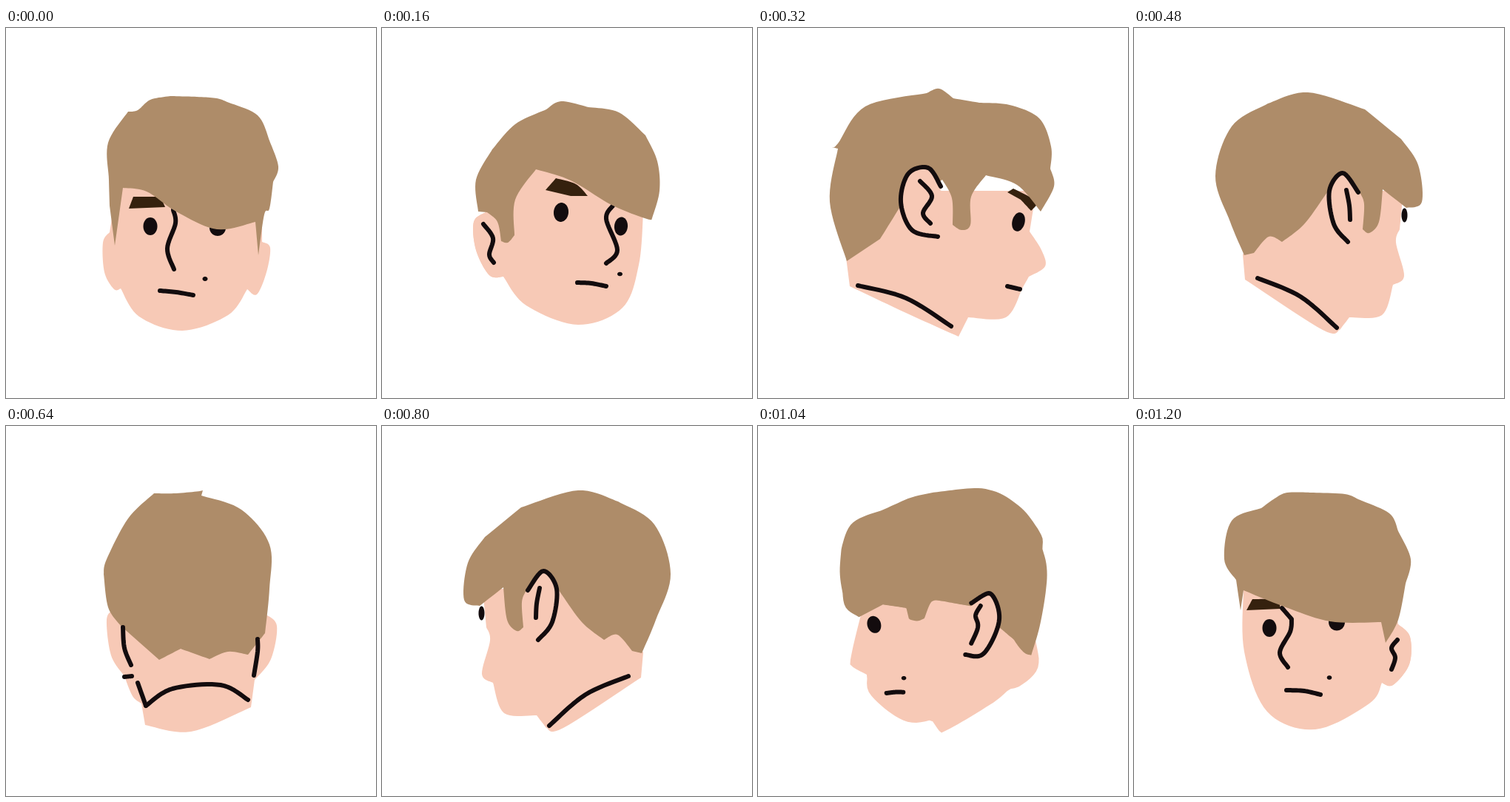
These frames come from a looping animation (500x500 px, 1.28 s). An HTML page with a canvas:

```html
<!DOCTYPE html>
<html lang="en">
<head>
<meta charset="utf-8">
<title>Turning head</title>
<style>
html, body { margin: 0; width: 100%; height: 100%; overflow: hidden; background: #fff; }
canvas { display: block; width: 100vw; height: 100vh; }
</style>
</head>
<body>
<canvas id="stage" width="500" height="500"></canvas>
<script>
const ctx = document.getElementById('stage').getContext('2d');
const STEP = 80;
const SKIN = '#f7c9b6', HAIR = '#ae8c69', INK = '#130c0e', BROW = '#35210e';

// Smooth polyline through a run of points.
function smooth(pts) {
  const out = [pts[0]];
  for (let i = 0; i < pts.length - 1; i++) {
    const b = pts[i], c = pts[i + 1], a = pts[i - 1] || b, d = pts[i + 2] || c;
    for (let k = 1; k <= 10; k++) {
      const t = k / 10;
      out.push([0, 1].map(j => b[j] + t / 2 * (c[j] - a[j]
        + t * (2 * a[j] - 5 * b[j] + 4 * c[j] - d[j] + t * (3 * b[j] - a[j] - 3 * c[j] + d[j])))));
    }
  }
  return out;
}

// "|" marks a corner, "/" parts the outline into runs that are blended separately.
function curve(text) {
  let last = null;
  return text.split('/').map(run => run.split('|').flatMap(part => {
    const pts = part.trim().split(/\s+/).map(p => p.split(',').map(Number));
    if (last) pts.unshift(last);
    last = pts[pts.length - 1];
    return smooth(pts);
  }));
}

function dot(x, y, rx, ry, tilt = 0) {
  const c = Math.cos(tilt), s = Math.sin(tilt);
  return [Array.from({ length: 40 }, (_, i) => {
    const a = i / 20 * Math.PI, u = rx * Math.cos(a), v = ry * Math.sin(a);
    return [x + u * c - v * s, y + u * s + v * c];
  })];
}

const front = {
  skin: curve('140,276 131,290 133,330 146,353 155,352 | 180,390 238,409 300,388 326,353 | 339,360 352,330 357,297 346,289 | 346,215 | 150,215'),
  hair: curve('147,294 140,240 | 139,205 138,155 165,113 | 178,111 195,97 222,92 | 258,93 285,95 299,100 | 340,118 356,152 | 368,187 361,208 | 356,244 349,252 341,307 / 337,262 | 285,272 230,248 190,221 158,216'),
  eye: dot(195, 268, 9.5, 12), eye2: dot(286, 270, 11, 11), mole: dot(269, 339, 3.5, 3),
  brow: curve('166,244 | 172,228 | 209,228 | 215,242'),
  nose: curve('226,246 229,264 218,298 227,326'),
  mouth: curve('208,355 230,357 253,361')
};

const rightHalf = {
  skin: curve('140,249 124,262 127,300 145,334 164,336 | 195,375 265,401 325,378 347,320 353,250 | 300,180 | 200,180'),
  hair: curve('130,248 127,205 149,164 | 180,130 222,110 | 242,99 279,107 | 320,114 356,145 | 372,180 375,220 365,257 / 358,258 310,239 255,206 208,191 | 180,232 179,280 | 170,290 161,288 | 156,262 142,249'),
  eye: dot(242, 249, 10, 13, .1), eye2: dot(323, 268, 9, 12.5, .1), mole: dot(321.5, 332.5, 3.5, 2.7),
  brow: curve('221,219 | 235,203 | 262,211 278,227 | 255,227'),
  nose: curve('312,240 303,258 318,300 303,318'),
  mouth: curve('264,344 283,345 303,349'),
  ear: curve('140,249 124,262 127,300 145,334 164,336'),
  inner: curve('137,265 150,284 145,306 151,317')
};

const rightSide = {
  skin: curve('119,310 124,349 | 200,385 271,417 | 284,391 | 335,391 357,352 | 366,336 | 388,322 383,300 367,275 | 376,220 | 200,220'),
  hair: curve('120,315 97,235 108,163 | 100,161 | 108,156 145,106 228,88 | 245,82 264,95 | 299,101 | 340,104 380,122 396,160 395,190 | 400,214 382,248 / 350,212 308,199 | 288,228 287,266 275,273 263,266 | 262,230 249,205 | 193,240 | 165,285'),
  eye: dot(352, 262, 8.5, 13, .25),
  brow: curve('337,222 | 345,217 | 370,230 376,240 | 369,247 | 355,232'),
  mouth: curve('337,349 354,353'),
  ear: curve('247,214 230,189 203,197 193,235 208,273 243,282'), rim: true,
  inner: curve('219,207 235,227 223,250 233,264'),
  neck: curve('135,348 200,365 261,403')
};

const rightAway = {
  skin: curve('147,306 150,340 | 255,408 278,408 | 291,391 | 335,388 350,347 | 365,335 354,290 359,272 | 364,220 | 200,220'),
  hair: curve('149,307 130,262 110,200 132,133 181,102 | 235,87 312,110 | 361,150 | 384,185 389,235 368,243 / 336,218 | 331,262 318,277 309,272 | 311,238 305,222 | 261,222 | 230,265 200,289 | 182,282 162,304'),
  eye: dot(365.5, 253, 4, 9.5),
  ear: curve('303,222 282,196 264,220 270,265 289,289'), rim: true,
  inner: curve('287,219 291,240 292,259'),
  neck: curve('167,338 225,363 274,405')
};

const back = {
  skin: curve('145,248 136,262 142,310 160,338 | 171,365 183,375 | 188,404 | 250,413 331,380 | 336,343 | 358,315 366,270 350,254 | 335,200 | 160,200'),
  hair: curve('155,270 138,245 132,200 | 136,180 165,125 200,91 | 230,91 262,88 | 266,87 | 264,94 | 318,113 356,160 356,220 350,280 / 327,309 | 300,305 275,315 | 236,301 | 207,316'),
  mouth: curve('160,339 170,338'),
  ear: curve('340,288 340,305 335,337'), rim: true,
  cheek: curve('158,272 160,300 169,323'),
  jaw: curve('178,347 189,378'),
  neck: curve('189,378 225,355 290,350 327,370')
};

const leftPast = {
  skin: curve('135,265 118,327 119,339 142,343 | 144,370 190,400 221,391 | 226,418 | 290,378 360,340 371,318 | 340,220 | 140,220'),
  hair: curve('132,263 109,248 112,169 | 126,133 168,111 | 230,88 310,83 376,135 | 385,150 381,165 | 392,220 372,318 / 355,317 330,295 284,234 | 235,226 | 220,230 219,268 | 210,275 199,273 | 200,253 | 170,251'),
  eye: dot(141, 266, 7.5, 11.5, -.25), mole: dot(157, 341, 2.7, 2.7),
  mouth: curve('152,363 161,358'),
  ear: curve('235,225 263,195 282,232 262,286 234,290'), rim: true,
  inner: curve('253,220 247,234 250,250 239,276'),
  neck: curve('359,333 290,362 227,411')
};

const leftSlight = {
  skin: curve('148,220 149,305 180,386 245,410 318,375 335,347 | 350,350 372,322 373,285 357,268 | 345,210 | 160,210'),
  hair: curve('144,249 138,208 | 122,180 132,128 172,111 | 190,98 207,90 240,90 | 285,92 303,99 | 345,118 357,142 | 374,180 367,213 | 357,262 340,293 / 334,265 | 265,264 200,243 148,222'),
  eye: dot(183, 273, 9.5, 12), eye2: dot(274, 265, 11, 11.5), mole: dot(264, 340, 3.3, 2.8),
  brow: curve('152,249 | 160,234 | 192,235 198,247'),
  nose: curve('200,246 213,261 | 211,278 197,306 208,326'),
  mouth: curve('206,357 230,358 252,363'),
  ear: curve('357,268 373,285 372,322 350,350 335,347'),
  inner: curve('356,289 348,300 353,313 348,329')
};

// Evenly spaced points along a run.
function spread(run, count = 120) {
  const len = [0];
  for (let i = 1; i < run.length; i++) {
    len.push(len[i - 1] + Math.hypot(run[i][0] - run[i - 1][0], run[i][1] - run[i - 1][1]));
  }
  let i = 1;
  return Array.from({ length: count }, (_, k) => {
    const at = len[len.length - 1] * k / (count - 1);
    while (i < run.length - 1 && len[i] < at) i++;
    return between(run[i - 1], run[i], (at - len[i - 1]) / (len[i] - len[i - 1] || 1));
  });
}

function between(p, q, t) {
  return [p[0] + (q[0] - p[0]) * t, p[1] + (q[1] - p[1]) * t];
}

function mix(a, b, t) {
  const pose = { rim: t < .5 ? a.rim : b.rim };
  for (const key in a) {
    if (key === 'rim' || !b[key]) continue;
    pose[key] = a[key].map((run, r) => {
      const to = spread(b[key][r]);
      return spread(run).map((p, i) => between(p, to[i], t));
    });
  }
  return pose;
}

const move = (part, fx) => part.map(run => run.map(([x, y]) => [fx(x), y]));
const shift = (part, dx) => move(part, x => x + dx);

function warp(pose, fx) {
  const out = { rim: pose.rim };
  for (const key in pose) if (key !== 'rim') out[key] = move(pose[key], fx);
  return out;
}

const flip = pose => warp(pose, x => 500 - x);
const widen = x => 250 + (x - 250) * 1.05 + 20 * Math.sin((x - 100) / 300 * Math.PI);

const rightBack = mix(rightAway, back, .5);
const leftSide = warp(leftPast, widen);

const poses = [
  front,
  { ...mix(front, rightHalf, .5), inner: rightHalf.inner },
  rightHalf,
  { ...mix(rightHalf, rightSide, .5), nose: shift(rightHalf.nose, 38) },
  rightSide,
  { ...mix(rightSide, rightAway, .5), mouth: rightSide.mouth },
  rightAway, rightBack, back, flip(rightBack), flip(rightAway),
  leftPast, leftSide,
  mix(leftSide, leftSlight, 1 / 3),
  {
    ...mix(leftSide, leftSlight, 2 / 3),
    eye2: shift(leftSlight.eye2, -28),
    nose: shift(leftSlight.nose, -20),
    brow: shift(leftSlight.brow, -8)
  },
  leftSlight
];

function trace(part) {
  ctx.beginPath();
  part.flat().forEach(p => ctx.lineTo(...p));
}

function fill(part, color) {
  if (!part) return;
  trace(part);
  ctx.fillStyle = color;
  ctx.fill();
}

function line(part) {
  if (!part) return;
  trace(part);
  ctx.stroke();
}

function draw(pose) {
  ctx.fillStyle = '#fff';
  ctx.fillRect(0, 0, 500, 500);
  ctx.lineWidth = 6;
  ctx.lineCap = ctx.lineJoin = 'round';
  ctx.strokeStyle = INK;
  fill(pose.skin, SKIN);
  for (const key of ['eye', 'eye2', 'mole']) fill(pose[key], INK);
  fill(pose.brow, BROW);
  line(pose.nose);
  line(pose.mouth);
  fill(pose.hair, HAIR);
  fill(pose.ear, SKIN);
  if (pose.rim) line(pose.ear);
  for (const key of ['inner', 'neck', 'jaw', 'cheek']) line(pose[key]);
}

const start = performance.now();
function tick() {
  const t = Math.max(0, performance.now() - start);
  draw(poses[Math.floor(t / STEP) % poses.length]);
  requestAnimationFrame(tick);
}
tick();
</script>
</body>
</html>
```
